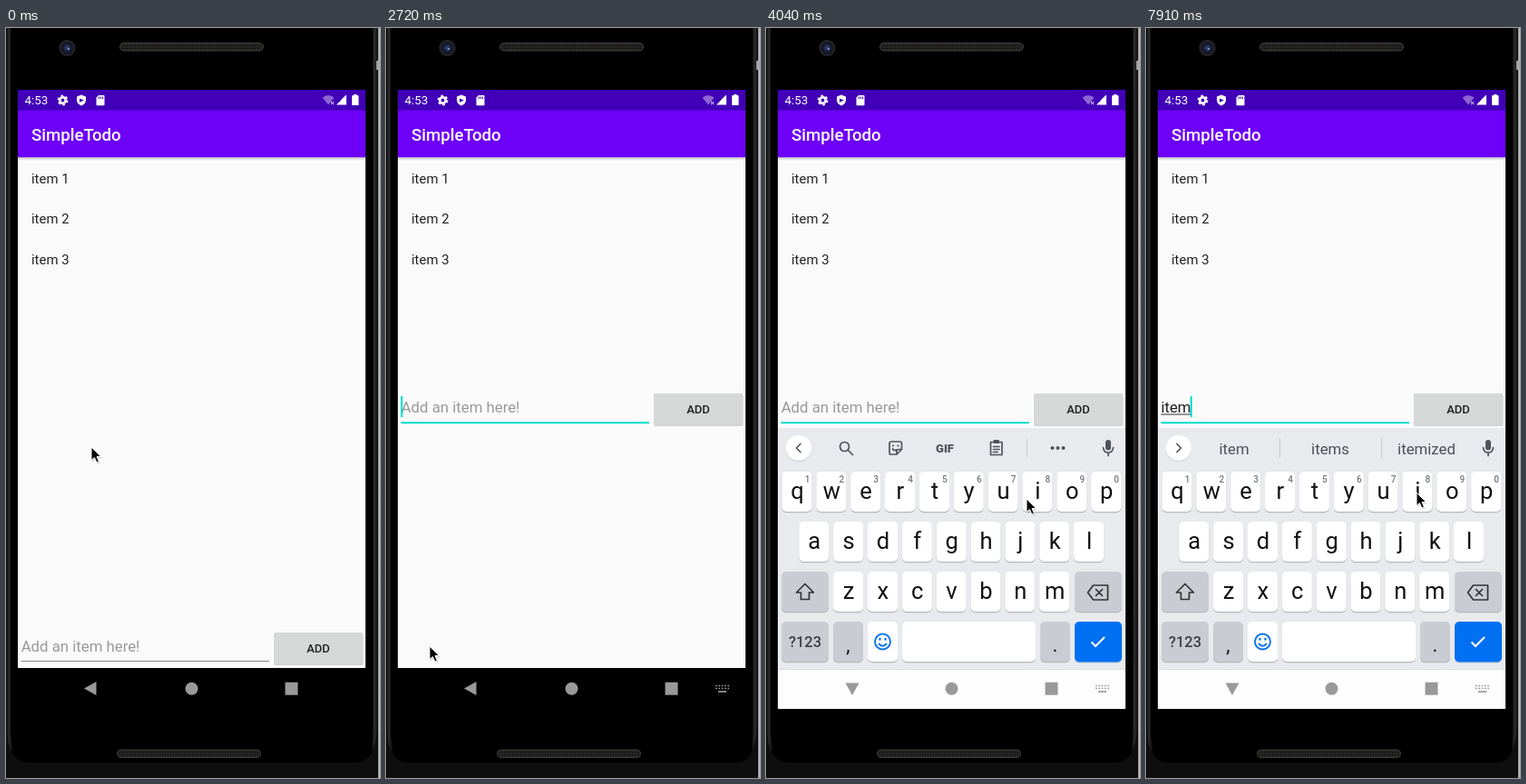
Recreate the animation shown at these times as an HTML page. Size 412 by 825 pixels, loop 8 s.

```html
<!DOCTYPE html>
<html lang="en">
<head>
<meta charset="utf-8">
<title>Todo list</title>
<style>
  html, body { margin: 0; width: 100%; height: 100%; overflow: hidden; background: #000; }
  svg { display: block; width: 412px; height: 825px; font-family: Roboto, sans-serif; }
  .mid { text-anchor: middle; }
  .line { fill: none; stroke: #50545a; stroke-width: 1.7; stroke-linecap: round; stroke-linejoin: round; }
  .item { font-size: 14.9px; fill: #222; }
  .field { font-size: 16.78px; fill: #1d1d1d; }
  .letter { font-size: 25.5px; fill: #111; text-anchor: middle; }
  .digit { font-size: 10px; font-weight: 500; fill: #74777c; text-anchor: middle; }
  .word { font-size: 16.8px; fill: #4c5056; text-anchor: middle; }
</style>
</head>
<body>
<svg id="stage" viewBox="0 0 412 825" xmlns="http://www.w3.org/2000/svg">
  <defs>
    <pattern id="mesh" width="3" height="3" patternUnits="userSpaceOnUse">
      <rect width="3" height="3" fill="#262522"/><circle cx="1.5" cy="1.5" r=".8" fill="#0c0c0c"/>
    </pattern>
    <linearGradient id="rim">
      <stop offset="0" stop-color="#080808"/><stop offset=".45" stop-color="#2c2c2c"/><stop offset="1" stop-color="#0c0c0c"/>
    </linearGradient>
    <linearGradient id="drop" x2="0" y2="1">
      <stop offset="0" stop-color="#000" stop-opacity=".22"/><stop offset="1" stop-color="#000" stop-opacity="0"/>
    </linearGradient>
    <radialGradient id="lens">
      <stop offset="0" stop-color="#34487c"/><stop offset=".4" stop-color="#1a2444"/><stop offset=".6" stop-color="#12141c"/><stop offset="1" stop-color="#2b2c30"/>
    </radialGradient>
  </defs>

  <g id="phone">
    <rect width="412" height="825" fill="#000"/>
    <rect width="7" height="825" fill="url(#rim)"/>
    <rect x="403" width="7" height="825" fill="url(#rim)"/>
    <rect x="410" width="2" height="825" fill="#b4b5b7"/>
    <rect x="408" y="36" width="4" height="10" fill="#a5a6a8"/>
    <path d="M0 770Q3 808 24 808H386Q406 808 409 770V825H0Z" fill="#0e0e0e"/>
    <path d="M5 0V775Q7 807 26 807H384Q403 807 404 775V0Z"/>
    <rect x="125.5" y="16.5" width="158" height="8.500" rx="4.200" fill="url(#mesh)" stroke="#403e3b"/>
    <rect x="122.5" y="794" width="158" height="8.500" rx="4.200" fill="url(#mesh)" stroke="#403e3b"/>
    <circle cx="67.5" cy="22" r="9" fill="url(#lens)"/>
    <circle cx="69" cy="23" r="1.100" fill="#8fa3d6"/>
  </g>

  <g id="app">
    <rect x="13" y="68" width="383" height="636" fill="#fafafa"/>
    <rect x="13" y="142" width="383" height="4" fill="url(#drop)"/>
    <rect x="13" y="68" width="383" height="23" fill="#4100b7"/>
    <rect x="13" y="90.500" width="383" height="51.700" fill="#6d00f6"/>
    <text x="28" y="123.700" font-size="18.64" font-weight="500" fill="#fff">SimpleTodo</text>
    <text x="20.500" y="84.300" font-size="13.400" fill="#fff">4:53</text>
    <g fill="#fff">
      <circle cx="62.500" cy="79.500" r="3.200" fill="none" stroke="#fff" stroke-width="2.600"/>
      <circle cx="62.500" cy="79.500" r="5" fill="none" stroke="#fff" stroke-width="1.800" stroke-dasharray="2.6 2.636"/>
      <path d="M83 73.500L88 75.500V79Q88 83.500 83 85.500Q78 83.500 78 79V75.500Z"/>
      <path d="M81 77.500L86 79.500L81 81.800Z" fill="#4100b7"/>
      <path d="M102 74H107.500Q108.500 74 108.500 75V84.500Q108.500 85.300 107.500 85.300H100.500Q99.500 85.300 99.500 84.500V76.500Z"/>
      <path d="M102.500 75.500V78M104.500 75.500V78M106.500 75.500V78" stroke="#4100b7"/>
      <path d="M348.500 76.500Q355 71.500 361.500 76.500L355 84.500Z" opacity=".4"/>
      <path d="M358 81L361 84M361 81L358 84" stroke="#fff"/>
      <path d="M375 73.500V84.500H364Z"/>
      <path d="M374 74L369 79V84H374Z" opacity=".6"/>
      <path d="M383 73H386.500V74.300H388.500V85H381V74.300H383Z"/>
    </g>
    <g id="items"></g>
    <g id="entry">
      <rect x="295" y="666.500" width="98.500" height="34.500" rx="2" fill="#000" opacity=".16"/>
      <rect x="295" y="665" width="98" height="34.500" rx="2" fill="#d6d7d7"/>
      <text class="mid" x="344" y="687" font-size="13.050" font-weight="500" fill="#222">ADD</text>
      <text id="hint" class="field" x="16.700" y="686" style="fill:#999">Add an item here!</text>
      <text id="typed" class="field" x="16.400" y="686"></text>
      <rect id="compose" x="16.400" y="687.500" height="1" fill="#333"/>
      <rect id="rule" x="16.500" width="273.500" height="1" fill="#858585"/>
      <rect id="caret" y="668" width="2" height="23" fill="#00dcc8"/>
    </g>
  </g>

  <g id="keyboard">
    <rect x="13" y="704" width="383" height="45" fill="#fdfdfd"/>
    <g id="panel">
      <rect x="13" y="440" width="383" height="265" fill="#e8eaed"/>
      <rect x="13" y="705" width="383" height="1" fill="#dadce0"/>
      <circle cx="36" cy="463" r="14" fill="#c9cbce"/>
      <circle cx="36" cy="462" r="14" fill="#fff"/>
      <path id="chevron" class="line" d="M38 457.500L33.500 462L38 466.500"/>
      <g id="tools">
        <circle class="line" cx="86.500" cy="460.500" r="5"/><path class="line" d="M90.500 464.500L95.500 469.500"/>
        <path class="line" d="M138 455H147.500Q149.500 455 149.500 457V463.500L144 469H138Q136 469 136 467V457Q136 455 138 455ZM149.500 463.500H146Q144 463.500 144 465.500V469M139.500 463Q141 465.500 143.500 464"/>
        <circle cx="140" cy="459.500" r="1.100" fill="#50545a"/><circle cx="145.500" cy="459.500" r="1.100" fill="#50545a"/>
        <text class="mid" x="197" y="466.800" font-size="13" font-weight="900" fill="#50545a">GIF</text>
        <path class="line" d="M247.500 455.500H260V469.500H247.500ZM250.500 460.500H257M250.500 463.500H257M250.500 466.500H255"/>
        <rect x="250.500" y="453" width="6.500" height="4" rx="1" fill="#50545a"/>
        <path d="M287.500 452V472" stroke="#cbcdd1"/>
        <g fill="#50545a"><circle cx="315.500" cy="462" r="2"/><circle cx="321.500" cy="462" r="2"/><circle cx="327.500" cy="462" r="2"/></g>
      </g>
      <g id="words">
        <path d="M147.500 451V473M259.500 451V473" stroke="#c5c8cc"/>
        <text class="word" x="97" y="468.500"></text><text class="word" x="203" y="468.500"></text><text class="word" x="309" y="468.500"></text>
      </g>
      <rect x="374" y="453" width="6" height="11.500" rx="3" fill="#50545a"/>
      <path class="line" d="M371.500 461.500Q372 467 377 467Q382 467 382.500 461.500M377 467V470.500"/>
      <g id="keys"></g>
      <path class="line" style="stroke:#333" d="M43 611.500L52.500 621H47.500V628.500H38.500V621H33.500Z"/>
      <path class="line" style="stroke:#333" d="M360.500 613H376.500V629H360.500L354.500 621ZM363.500 617.500L370.500 624.500M370.500 617.500L363.500 624.500"/>
      <g fill="none" stroke="#0b74ee" stroke-width="1.900" stroke-linecap="round">
        <circle cx="128.500" cy="675" r="8.500"/><path d="M124.500 677.500Q128.500 682 132.500 677.500"/>
        <path d="M125.500 672V672.500M131.500 672V672.500" stroke-width="2.400"/>
      </g>
      <path d="M358.500 675.500L363 680L373 670" fill="none" stroke="#fff" stroke-width="2"/>
    </g>
  </g>

  <g id="nav" fill="#999">
    <path id="back" d="M86 726.500L99.500 719V734Z"/>
    <circle cx="204.500" cy="726.700" r="7"/>
    <rect x="307.500" y="719.700" width="14" height="14"/>
    <g id="switch" fill="none" stroke="#999" stroke-width="1.700">
      <path d="M363 723.500H378M363 726.500H378" stroke-dasharray="1.700 1.600"/><path d="M366 730H375"/>
    </g>
  </g>

  <g id="pointer">
    <path d="M1 2V16.500L4.500 13.500L7 18.500L9.500 17.500L7.500 12.500H12Z" opacity=".15"/>
    <path d="M0 0V14.500L3.400 11.500L5.900 17L8.400 15.900L6 10.500H10.500Z" stroke="#fff" stroke-width="1" stroke-linejoin="round"/>
  </g>
</svg>

<script>
const LOOP = 8000;
const $ = id => document.getElementById(id);
const set = (node, attrs) => Object.entries(attrs).forEach(([k, v]) => node.setAttribute(k, v));
const show = (id, on) => $(id).style.display = on ? "" : "none";

$("items").innerHTML = [1, 2, 3].map(n =>
  `<text class="item" x="28" y="${126 + n * 44.7}">item ${n}</text>`).join("");

const PITCH = 37.85, GREY = "#c9ccd2";
const key = (x, y, w = 33, fill = "#fff", shade = "#b4b7bc") =>
  `<rect x="${x}" y="${y + 1.2}" width="${w}" height="44" rx="5" fill="${shade}"/>
   <rect x="${x}" y="${y}" width="${w}" height="44" rx="5" fill="${fill}"/>`;
const row = (letters, center, y, digits = "") => [...letters].map((c, i) => {
  const x = center + i * PITCH;
  const digit = digits ? `<text class="digit" x="${x + 11.5}" y="${y + 12}">${digits[i]}</text>` : "";
  return key(x - 16.5, y) + `<text class="letter" x="${x + .4}" y="${y + 30}">${c}</text>` + digit;
}).join("");

$("keys").innerHTML =
  row("qwertyuiop", 34, 488, "1234567890") + row("asdfghjkl", 52.8, 543) + row("zxcvbnm", 90.6, 598) +
  key(17, 598, 52, GREY) + key(340, 598, 52, GREY) +
  key(17, 653, 52, GREY) + key(74, 653, 33, GREY) + key(112, 653) + key(150, 653, 147) +
  key(302, 653, 33, GREY) + key(340, 653, 52, "#0070f2", "#6f9fd6") +
  `<text class="mid" x="43" y="681" font-size="16.500" font-weight="500" fill="#3c4045">?123</text>
   <text class="letter" x="90.500" y="686" style="font-size:22px">,</text>
   <text class="letter" x="318.500" y="686" style="font-size:22px">.</text>`;

// Each track is a list of [time, value]; a value holds until the next one.
const tracks = {
  pointer: [
    [0, [94, 461]], [500, [93, 468]], [650, [89, 504]], [800, [83, 562]], [940, [78, 622]],
    [1090, [75, 666]], [1240, [74, 682]], [1390, [60, 682]], [1530, [69, 682]],
    [2130, [60, 686]], [2270, [48, 680]],
    [3460, [58, 672]], [3610, [108, 642]], [3750, [182, 592]], [3900, [250, 545]],
    [4040, [287, 518]], [4190, [296, 513]], [4340, [298, 511]]],
  focus: [[0, false], [2570, true]],
  lift: [[0, 0], [2720, -263]],
  slide: [[0, null], [2860, 11], [3010, 2], [3160, 0]],
  turn: [[0, 0], [2860, 180], [3010, 262], [3160, 270]],
  caret: [[0, false], [2570, true], [3610, false], [4190, true], [4640, false], [5090, true], [7310, false], [7910, true]],
  typed: [[0, ""], [5390, "i"], [5840, "it"], [6430, "ite"], [6570, "item"]],
  marked: [[0, 0], [5690, 1], [5980, 2], [6570, 3], [6870, 4]],
  words: [[0, null], [5690, ["i", "I", "it"]], [5980, ["it", "it's", "its"]],
    [6570, ["ite", "item", "Ite"]], [6870, ["item", "items", "itemized"]]]
};
const at = (name, t) => tracks[name].findLast(([time]) => time <= t)[1];

function draw(t) {
  const [x, y] = at("pointer", t);
  const focus = at("focus", t), slide = at("slide", t);
  const typed = at("typed", t), marked = at("marked", t), words = at("words", t);

  set($("pointer"), { transform: `translate(${x} ${y})` });
  set($("entry"), { transform: `translate(0 ${at("lift", t)})` });
  set($("rule"), focus ? { y: 696.3, height: 1.9, fill: "#00dcc8" } : { y: 696, height: 1, fill: "#858585" });

  show("hint", !typed);
  const field = $("typed");
  if (field.textContent !== typed) field.textContent = typed;
  const width = n => n ? field.getSubStringLength(0, n) : 0;
  set($("compose"), { width: width(marked) });
  set($("caret"), { x: Math.max(16.3, 15.6 + width(typed.length)) });
  show("caret", at("caret", t));

  show("keyboard", slide !== null);
  set($("panel"), { transform: `translate(0 ${slide ?? 0})` });
  show("switch", at("lift", t) < 0);
  set($("back"), { transform: `rotate(${at("turn", t)} 94.300 725.800)` });

  show("tools", !words);
  show("words", words);
  set($("chevron"), { transform: words ? "rotate(180 36 462)" : "" });
  if (words) $("words").querySelectorAll("text").forEach((node, i) => node.textContent = words[i]);
}

const start = performance.now();
function tick() {
  draw((performance.now() - start) % LOOP);
  requestAnimationFrame(tick);
}
tick();
</script>
</body>
</html>
```
